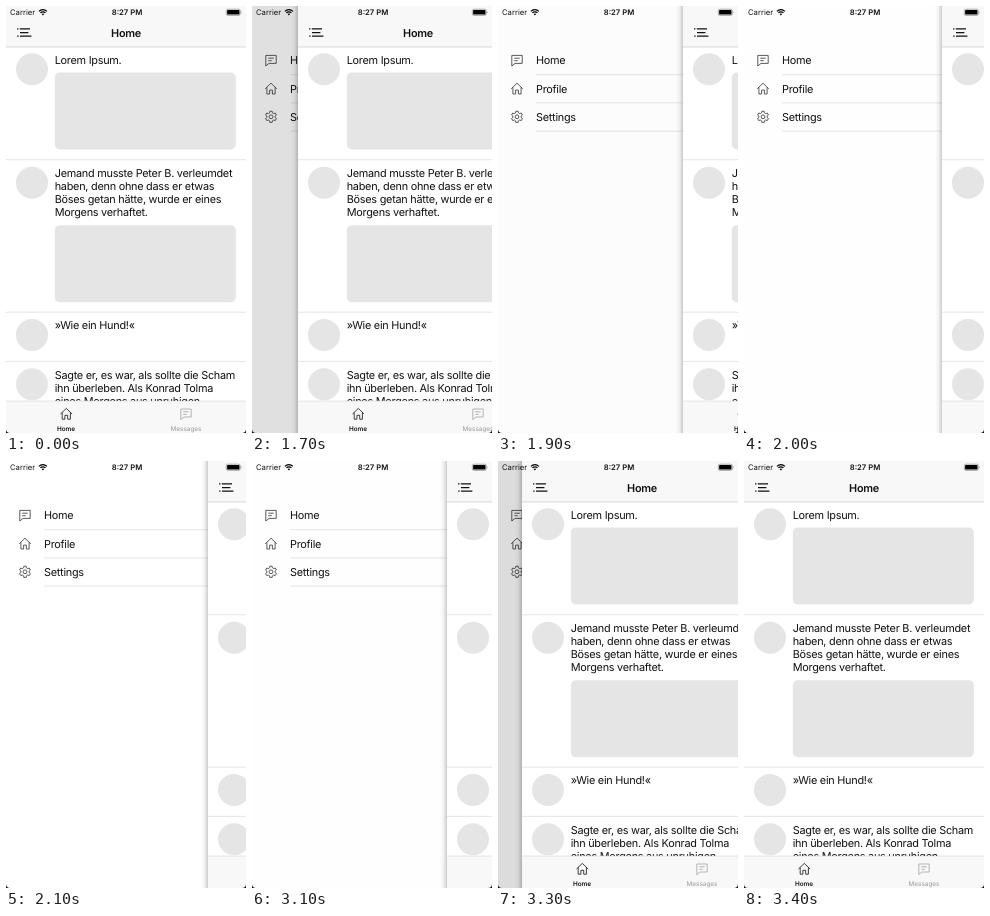
Recreate the animation shown at these times as an HTML page. Size 240 px wide and 427 px high, loop 4300 ms.

```html
<!DOCTYPE html>
<html lang="de">
<head>
<meta charset="utf-8">
<title>Drawer menu</title>
<style>
  html, body { margin: 0; width: 100%; height: 100%; overflow: hidden; background: #fff; }
  svg { display: block; width: 100vw; height: 100vh; }
  text { font: 10.88px Inter, "Open Sans", sans-serif; letter-spacing: -.26px; fill: #111; text-rendering: geometricPrecision; }
  .bold { font-weight: 600; }
  .mid { text-anchor: middle; }
  .status { font-size: 7.68px; letter-spacing: 0; }
  .tab { font-size: 6.4px; letter-spacing: 0; }
  .soft { fill: #999; }
  .icon { fill: none; stroke: #333; stroke-width: .8; stroke-linejoin: round; }
  .rule { stroke: #dcdcdc; stroke-width: .7; }
  .grey { fill: #e5e5e5; }
  .bar { fill: #f8f8f8; }
</style>
</head>
<body>
<svg viewBox="0 0 240 427" preserveAspectRatio="none">
  <defs>
    <path id="message" d="M-5.2-5h10.4v8h-7.2l-3.2 2.6zM-2.7-2.2h5.4M-2.7.3h3.4"/>
    <path id="house" d="M-5.8.2 0-5.4 5.8 .2M-4.1-1.3v6.7h2.7v-3.9h2.8v3.9h2.7v-6.7"/>
    <path id="gear"/>
    <clipPath id="body"><rect y="41" width="240" height="354"/></clipPath>
    <linearGradient id="shade">
      <stop offset="0" stop-opacity="0"/>
      <stop offset=".5" stop-opacity=".05"/>
      <stop offset="1" stop-opacity=".2"/>
    </linearGradient>
  </defs>

  <rect width="240" height="427" fill="#fff"/>
  <g id="menu"></g>
  <rect id="dim" width="240" height="427"/>

  <g id="panel">
    <rect x="-7" width="7" height="427" fill="url(#shade)"/>
    <rect width="250" height="427" fill="#fff"/>
    <g id="feed" clip-path="url(#body)"></g>
    <rect class="bar" width="240" height="41"/>
    <path class="rule" style="stroke:#c8c8c8" d="M0 41h240M0 395.2h240"/>
    <path d="M11 22.8h1.4M13.8 22.8h10.2M14 26.5h8.4M11.2 30.2h1.4M14 30.2h11.4" fill="none" stroke="#111" stroke-width="1.25"/>
    <text class="bold mid" x="120" y="30.5">Home</text>
    <rect class="bar" y="395.5" width="240" height="31.5"/>
    <use class="icon" style="stroke:#111" href="#house" x="60.3" y="407.8"/>
    <text class="tab bold mid" x="60" y="425">Home</text>
    <use class="icon" style="stroke:#a2a2a2" href="#message" x="180" y="408"/>
    <text class="tab mid soft" x="180" y="425">Messages</text>
  </g>

  <text class="status" x="4" y="8.9">Carrier</text>
  <path d="M32.9 5.3a5.6 5.6 0 0 1 8 0M34.4 6.9a3.5 3.5 0 0 1 5 0" fill="none" stroke="#000" stroke-width="1.2"/>
  <path d="M35.6 8.1a1.9 1.9 0 0 1 2.6 0l-1.3 1.4z"/>
  <text class="status bold mid" x="121" y="8.9">8:27 PM</text>
  <rect x="220.3" y="3.2" width="14" height="6.2" rx="1.6" fill="none" stroke="#777" stroke-width=".6"/>
  <rect x="221.1" y="4" width="12.4" height="4.6" rx=".9"/>
  <path d="M235.2 5.3q1.2 1 0 2z" fill="#777"/>
  <path d="M0 423v4h4a4 4 0 0 1-4-4M240 423v4h-4a4 4 0 0 0 4-4"/>
</svg>

<script>
const $ = id => document.getElementById(id);
const LOOP = 4300, STEP = 100, WIDTH = 202;
const OPEN_AT = 1700, CLOSE_AT = 3100;
const opening = [46, 133, 185, 198, WIDTH];
const closing = [195, 100, 24, 0];

function gearPath() {
  const points = [];
  for (let tooth = 0; tooth < 6; tooth++) {
    for (const [turn, radius] of [[-.32, 4.2], [-.2, 5.7], [.2, 5.7], [.32, 4.2]]) {
      const angle = (tooth + turn) * Math.PI / 3;
      points.push(`${radius * Math.sin(angle)} ${-radius * Math.cos(angle)}`);
    }
  }
  return `M${points.join("L")}zM1.9 0a1.9 1.9 0 1 1-3.8 0a1.9 1.9 0 1 1 3.8 0`;
}
$("gear").setAttribute("d", gearPath());

$("menu").innerHTML = [["message", "Home"], ["house", "Profile"], ["gear", "Settings"]]
  .map(([icon, label], i) => {
    const y = 54.4 + 28.2 * i;
    return `<use class="icon" href="#${icon}" x="19" y="${y}"/>
      <text x="38" y="${y + 4}">${label}</text>
      <path class="rule" d="M38 ${y + 14.3}h202"/>`;
  }).join("");

const posts = [
  { top: 41, bottom: 153.7, lines: ["Lorem Ipsum."], box: 66.5 },
  { top: 154.4, bottom: 306.2, box: 219.3, lines: [
    "Jemand musste Peter B. verleumdet", "haben, denn ohne dass er etwas",
    "Böses getan hätte, wurde er eines", "Morgens verhaftet."] },
  { top: 306.6, bottom: 355.4, lines: ["»Wie ein Hund!«"] },
  { top: 356, bottom: 500, lines: [
    "Sagte er, es war, als sollte die Scham", "ihn überleben. Als Konrad Tolma",
    "eines Morgens aus unruhigen"] }
];
$("feed").innerHTML = posts.map(({ top, bottom, lines, box }) => `
  <circle class="grey" cx="26" cy="${top + 22.3}" r="16"/>
  ${lines.map((line, i) => `<text x="48.7" y="${top + 16.5 + 13 * i}">${line}</text>`).join("")}
  ${box ? `<rect class="grey" x="48.8" y="${box}" width="181" height="77" rx="5"/>` : ""}
  <path class="rule" d="M0 ${bottom}h240"/>`).join("");

function offsetAt(time) {
  const [path, start] = time < CLOSE_AT ? [opening, OPEN_AT] : [closing, CLOSE_AT];
  if (time < start) return 0;
  return path[Math.min(Math.floor((time - start) / STEP), path.length - 1)];
}

function draw() {
  const x = offsetAt(performance.now() % LOOP);
  $("panel").setAttribute("transform", `translate(${x})`);
  $("dim").setAttribute("fill-opacity", .155 * (1 - x / WIDTH));
  requestAnimationFrame(draw);
}
draw();
</script>
</body>
</html>
```
